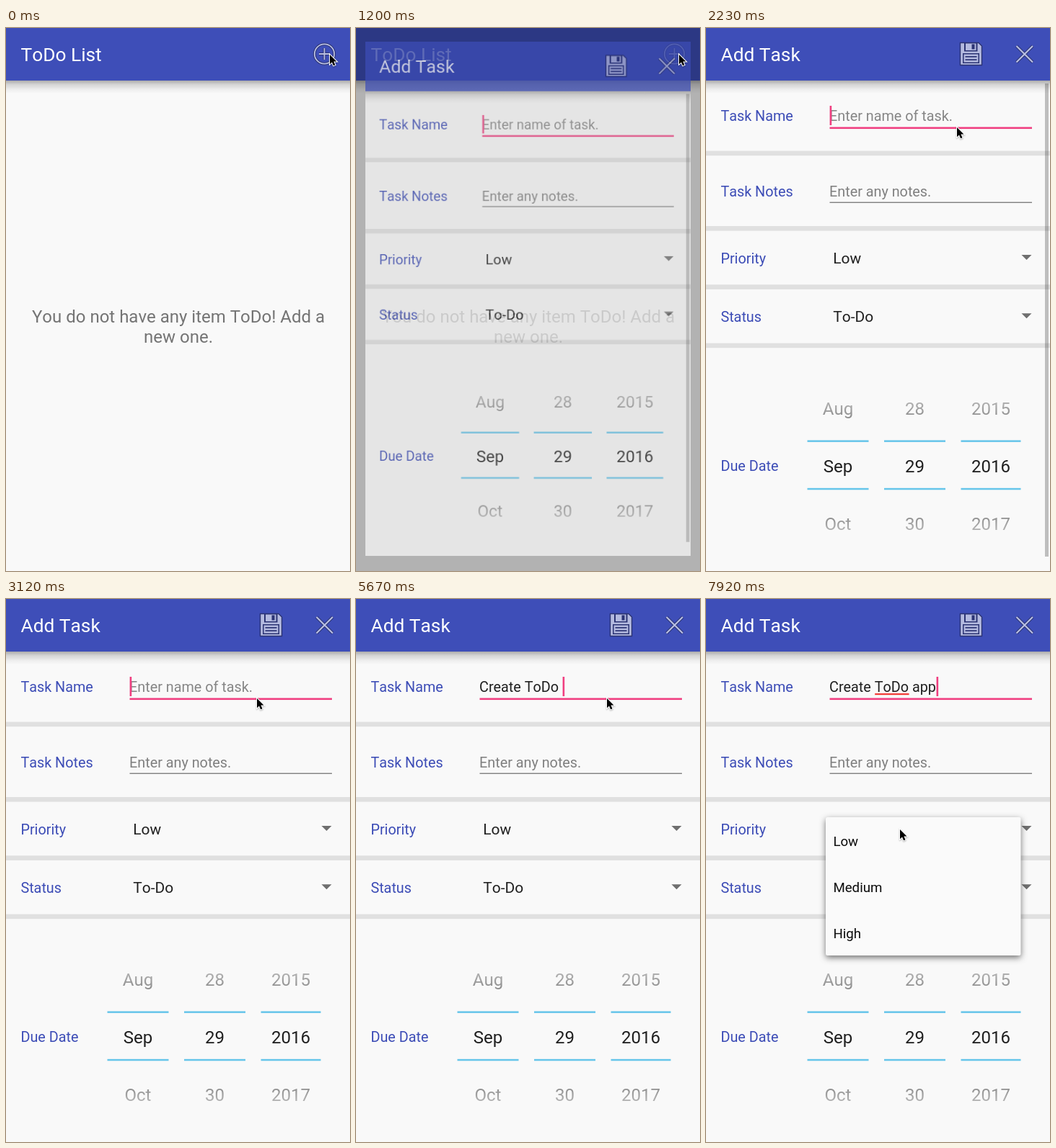
An HTML page with a canvas for the animation above (8 s loop, 477x754 px).

```html
<!DOCTYPE html>
<html lang="en">
<head>
<meta charset="utf-8">
<title>ToDo List</title>
<style>
html, body { margin: 0; width: 477px; height: 754px; overflow: hidden; background: #f9f9f9; }
canvas { display: block; }
</style>
</head>
<body>
<canvas id="stage" width="477" height="754"></canvas>
<script>
const W = 477, H = 754, LOOP = 8000;
const BLUE = '#3e4eb8', PAPER = '#f9f9f9', PINK = '#f03f80', INK = '#1f1f1f';
const FIELD_X = 171, FIELD_SIZE = 19.8;

const stage = document.getElementById('stage').getContext('2d');
const sheet = document.createElement('canvas');
sheet.width = W;
sheet.height = H;
const form = sheet.getContext('2d');
stage.fontKerning = form.fontKerning = 'none';

// Each track is a list of [start time, value]; values hold until the next step.
const pointer = [[0, [448, 36]], [750, [447.5, 36]], [1050, [447, 36]],
  [1480, [424, 66]], [1630, [375, 118]], [1780, [347, 137]],
  [6870, [312, 214]], [7020, [276, 313]], [7170, [270, 318]], [7320, [268, 319]]];
const typed = [[0, ''], [3720, 'C'], [4170, 'Cre'], [4320, 'Crea'], [4470, 'Creat'],
  [4620, 'Create'], [4770, 'Create T'], [5070, 'Create To'], [5370, 'Create ToD'],
  [5520, 'Create ToDo'], [5670, 'Create ToDo '], [5970, 'Create ToDo a'],
  [6120, 'Create ToDo ap'], [6270, 'Create ToDo app']];
const caret = [[0, true], [1630, false], [2080, true], [2530, false], [3120, true],
  [3570, false], [3720, true], [6720, false], [7170, true]];
const scrollbar = [[0, 0.24], [2380, 0.1], [2530, 0]];
const dialog = [[0, null], [1200, { alpha: 0.72, scale: 0.947 }], [1350, { alpha: 1, scale: 1 }]];
const popup = [[0, null], [7620, { alpha: 0.6, scale: 0.93 }], [7770, { alpha: 1, scale: 1 }]];

function at(track, t) {
  let value = track[0][1];
  for (const [start, v] of track) if (t >= start) value = v;
  return value;
}

function rect(c, x, y, w, h, color) {
  c.fillStyle = color;
  c.fillRect(x, y, w, h);
}

function text(c, str, x, y, size, color, align = 'left') {
  c.font = `${size}px Roboto, sans-serif`;
  c.textAlign = align;
  c.fillStyle = color;
  c.fillText(str, x, y);
}

function polygon(c, points) {
  c.beginPath();
  points.forEach(([x, y]) => c.lineTo(x, y));
  c.closePath();
}

// Light line with a dark rim, as on the toolbar icons.
function rimmed(c, trace, width) {
  for (const [w, color] of [[width + 2, '#2b3373'], [width, '#b9bfe3']]) {
    c.lineWidth = w;
    c.strokeStyle = color;
    c.beginPath();
    trace();
    c.stroke();
  }
}

function scaleAbout(c, x, y, s) {
  c.translate(x, y);
  c.scale(s, s);
  c.translate(-x, -y);
}

function page(c, title) {
  rect(c, 0, 0, W, H, PAPER);
  const shade = c.createLinearGradient(0, 73, 0, 91);
  shade.addColorStop(0, 'rgba(0,0,0,.31)');
  shade.addColorStop(0.3, 'rgba(0,0,0,.15)');
  shade.addColorStop(0.7, 'rgba(0,0,0,.045)');
  shade.addColorStop(1, 'rgba(0,0,0,0)');
  rect(c, 0, 73, W, 18, shade);
  rect(c, 0, 0, W, 73, BLUE);
  text(c, title, 20.5, 46, 26.3, '#fff');
}

function drawList(c) {
  page(c, 'ToDo List');
  rimmed(c, () => c.arc(441.5, 36, 13.7, 0, Math.PI * 2), 1.8);
  rimmed(c, () => {
    c.moveTo(434, 36); c.lineTo(449, 36);
    c.moveTo(441.5, 28); c.lineTo(441.5, 44);
  }, 1.8);
  text(c, 'You do not have any item ToDo! Add a', 239, 409, 24, '#747474', 'center');
  text(c, 'new one.', 239, 437, 24, '#747474', 'center');
}

function drawSave(c) {
  polygon(c, [[352.5, 20.5], [378, 20.5], [382.5, 25], [382.5, 51.5], [352.5, 51.5]]);
  c.fillStyle = '#b4badf';
  c.fill();
  c.strokeStyle = '#2b3373';
  c.lineWidth = 1.4;
  c.stroke();
  rect(c, 358, 21, 18.5, 11.5, '#2b3373');
  rect(c, 360, 21.5, 14.5, 9.5, '#b4badf');
  rect(c, 368.5, 22.5, 4, 7, '#2b3373');
  rect(c, 356, 35, 23, 14, '#2b3373');
  rect(c, 357.5, 36.5, 20, 11, '#b4badf');
  rect(c, 359.5, 39, 16, 1.7, '#2b3373');
  rect(c, 359.5, 43.3, 16, 1.7, '#2b3373');
}

function drawClose(c) {
  rimmed(c, () => {
    c.moveTo(430.5, 25); c.lineTo(453, 47.5);
    c.moveTo(453, 25); c.lineTo(430.5, 47.5);
  }, 2.2);
}

function drawField(c, t) {
  const str = at(typed, t);
  if (str) text(c, str, FIELD_X, 129, FIELD_SIZE, INK);
  else text(c, 'Enter name of task.', FIELD_X, 129, FIELD_SIZE, '#868686');
  rect(c, 171.5, 137.5, 280.5, 2.6, PINK);
  if (t >= 5820) {
    const left = FIELD_X + c.measureText('Create ').width;
    rect(c, left + 0.5, 131, c.measureText('ToDo').width, 2.2, '#f23b36');
  }
  if (at(caret, t)) rect(c, FIELD_X + 0.6 + c.measureText(str).width, 108, 2.6, 27, PINK);
}

function drawSpinner(c, value, y) {
  text(c, value, 176.3, y, 20.9, INK);
  polygon(c, [[437.5, y - 12], [451.5, y - 12], [444.5, y - 5]]);
  c.fillStyle = '#6f6f6f';
  c.fill();
}

function drawWheel(c, x, w, values) {
  const mid = x + w / 2;
  const faded = (top, from, to) => {
    const g = c.createLinearGradient(0, top, 0, top + 22);
    g.addColorStop(0, from);
    g.addColorStop(1, to);
    return g;
  };
  text(c, values[0], mid, 536.5, 24, faded(519, '#b2b2b2', '#8c8c8c'), 'center');
  text(c, values[1], mid, 616.5, 24, INK, 'center');
  text(c, values[2], mid, 696.5, 24, faded(678, '#8c8c8c', '#b8b8b8'), 'center');
  rect(c, x, 572.4, w, 2.5, '#66c5ea');
  rect(c, x, 638.8, w, 2.5, '#66c5ea');
}

function drawForm(c, t) {
  page(c, 'Add Task');
  drawSave(c);
  drawClose(c);
  for (const y of [170.6, 275, 356.3, 437.6]) rect(c, 0, y, W, 6.6, '#e0e0e0');
  const labels = [['Task Name', 129], ['Task Notes', 233.5], ['Priority', 326.5],
    ['Status', 408], ['Due Date', 614.5]];
  for (const [label, y] of labels) text(c, label, 20.4, y, 19.8, '#3c4cb6');
  drawField(c, t);
  text(c, 'Enter any notes.', FIELD_X, 233.5, FIELD_SIZE, '#808080');
  rect(c, 171.5, 241.6, 280.5, 1.3, '#757575');
  drawSpinner(c, 'Low', 327);
  drawSpinner(c, 'To-Do', 408.3);
  drawWheel(c, 140.5, 85, ['Aug', 'Sep', 'Oct']);
  drawWheel(c, 247, 85, ['28', '29', '30']);
  drawWheel(c, 353.5, 83, ['2015', '2016', '2017']);
  rect(c, 470, 77, 5, 657, `rgba(0,0,0,${at(scrollbar, t)})`);
}

function drawPopup(c, { alpha, scale }) {
  c.save();
  c.globalAlpha = alpha;
  scaleAbout(c, 301, 399, scale);
  c.shadowColor = 'rgba(0,0,0,.55)';
  c.shadowBlur = 9;
  c.shadowOffsetY = 3;
  c.fillStyle = '#fafafa';
  c.beginPath();
  c.roundRect(166, 303, 270.5, 192, 2.5);
  c.fill();
  c.shadowColor = 'transparent';
  ['Low', 'Medium', 'High'].forEach((v, i) => text(c, v, 176.4, 342.5 + i * 64, 18.7, '#0c0c0c'));
  c.restore();
}

function drawPointer(c, [x, y]) {
  c.save();
  c.translate(x + 1, y + 1);
  polygon(c, [[0, 0], [0, 13.2], [3, 10.4], [5.1, 15.2], [7.5, 14.2], [5.4, 9.5], [9.5, 9.5]]);
  c.shadowColor = 'rgba(0,0,0,.3)';
  c.shadowBlur = 2;
  c.shadowOffsetY = 1;
  c.lineWidth = 2;
  c.strokeStyle = '#fff';
  c.stroke();
  c.shadowColor = 'transparent';
  c.fillStyle = '#000';
  c.fill();
  c.restore();
}

function draw(t) {
  const shown = at(dialog, t);
  if (!shown || shown.alpha < 1) drawList(stage);
  if (shown) {
    drawForm(form, t);
    if (shown.alpha < 1) rect(stage, 0, 0, W, H, 'rgba(0,0,0,.285)');
    stage.save();
    stage.globalAlpha = shown.alpha;
    scaleAbout(stage, W / 2, 350, shown.scale);
    stage.drawImage(sheet, 0, 0);
    stage.restore();
  }
  const menu = at(popup, t);
  if (menu) drawPopup(stage, menu);
  drawPointer(stage, at(pointer, t));
}

const begin = performance.now();
function tick() {
  draw((performance.now() - begin) % LOOP);
  requestAnimationFrame(tick);
}
tick();
</script>
</body>
</html>
```
